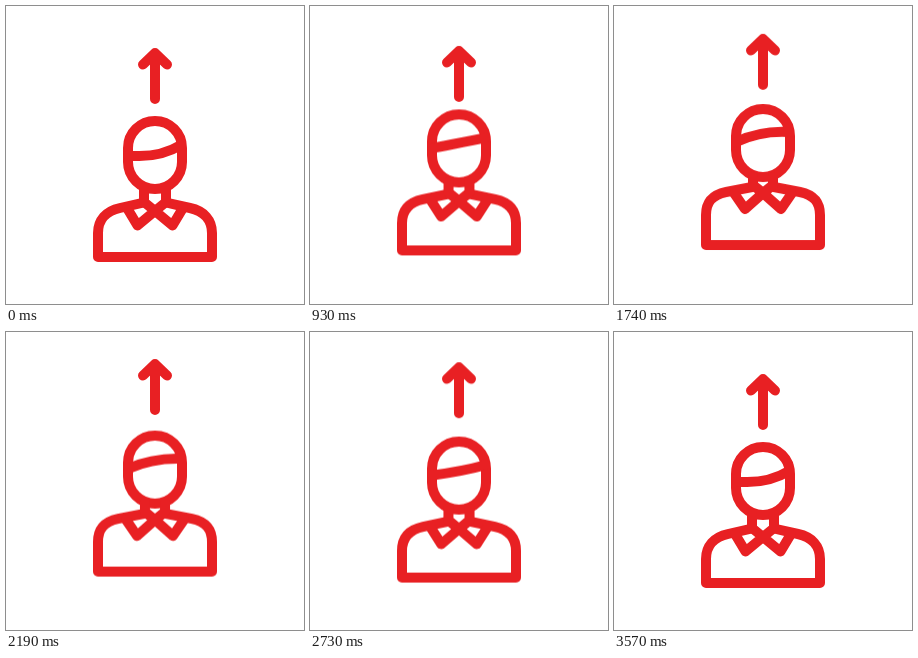
Animation of 298x298 px, one loop 3.6 s. Source, as an HTML page without scripts:

```html
<!DOCTYPE html>
<html lang="en">
<head>
<meta charset="utf-8">
<title>Looking up</title>
<style>
  html, body { margin: 0; width: 100%; height: 100%; overflow: hidden; background: #fff; }
  svg {
    display: block; width: 100vw; height: 100vh;
    fill: none; stroke: #e82023; stroke-width: 10;
    stroke-linecap: round; stroke-linejoin: round;
  }

  .person, .hair, .torso, .collar {
    animation: 3.6s cubic-bezier(.65, 0, .35, 1) infinite;
  }
  .person { animation-name: rise; }
  .hair { animation-name: tilt; }
  .torso { animation-name: stretch; }
  .collar { animation-name: lift; }
  .arrow { animation: launch 3.6s ease-in-out infinite; }

  @keyframes rise {
    50% { transform: translateY(-12px); }
  }
  @keyframes tilt {
    0%, 100% { d: path("M122 149.5C141 151.5 160 148 175 139"); }
    50% { d: path("M122 148C139 140 158 137 175 138"); }
  }
  @keyframes stretch {
    0%, 100% { d: path("M138 196.5L114 202C100 205 92 214 92 227V251H206V227C206 214 198 205 184 202L160 196.5"); }
    50% { d: path("M138 193L112 198C98 201 92 208 92 221V251H206V221C206 208 200 201 186 198L160 193"); }
  }
  @keyframes lift {
    0%, 100% { d: path("M121 202L131.5 219.5L149 205L138 196V182"); }
    50% { d: path("M120 199L131 215L149 199L139 191V182"); }
  }

  /* Dips, shoots past its rest height, settles, then drops back. */
  @keyframes launch {
    0% { transform: translateY(0); }
    15% { transform: translateY(4.5px); animation-timing-function: ease-in; }
    25.83% { transform: translateY(-2px); animation-timing-function: linear; }
    30% { transform: translateY(-11px); animation-timing-function: ease-out; }
    37.5% { transform: translateY(-22px); }
    49.5% { transform: translateY(-14px); }
    60%, 69% { transform: translateY(-15px); animation-timing-function: ease-in; }
    75% { transform: translateY(-13px); animation-timing-function: linear; }
    82.5% { transform: translateY(-2px); animation-timing-function: ease-out; }
    89%, 100% { transform: translateY(0); }
  }
</style>
</head>
<body>
<svg viewBox="0 0 298 298">
  <path class="arrow" d="M149 93V47M137 58.5L149 47L161 58.5"/>
  <g class="person">
    <rect x="122" y="115" width="54" height="68" rx="27"/>
    <path class="hair" d="M122 149.5C141 151.5 160 148 175 139"/>
    <path class="torso" d="M138 196.5L114 202C100 205 92 214 92 227V251H206V227C206 214 198 205 184 202L160 196.5"/>
    <path class="collar" d="M121 202L131.5 219.5L149 205L138 196V182"/>
    <g transform="matrix(-1 0 0 1 298 0)">
      <path class="collar" d="M121 202L131.5 219.5L149 205L138 196V182"/>
    </g>
  </g>
</svg>
</body>
</html>
```
